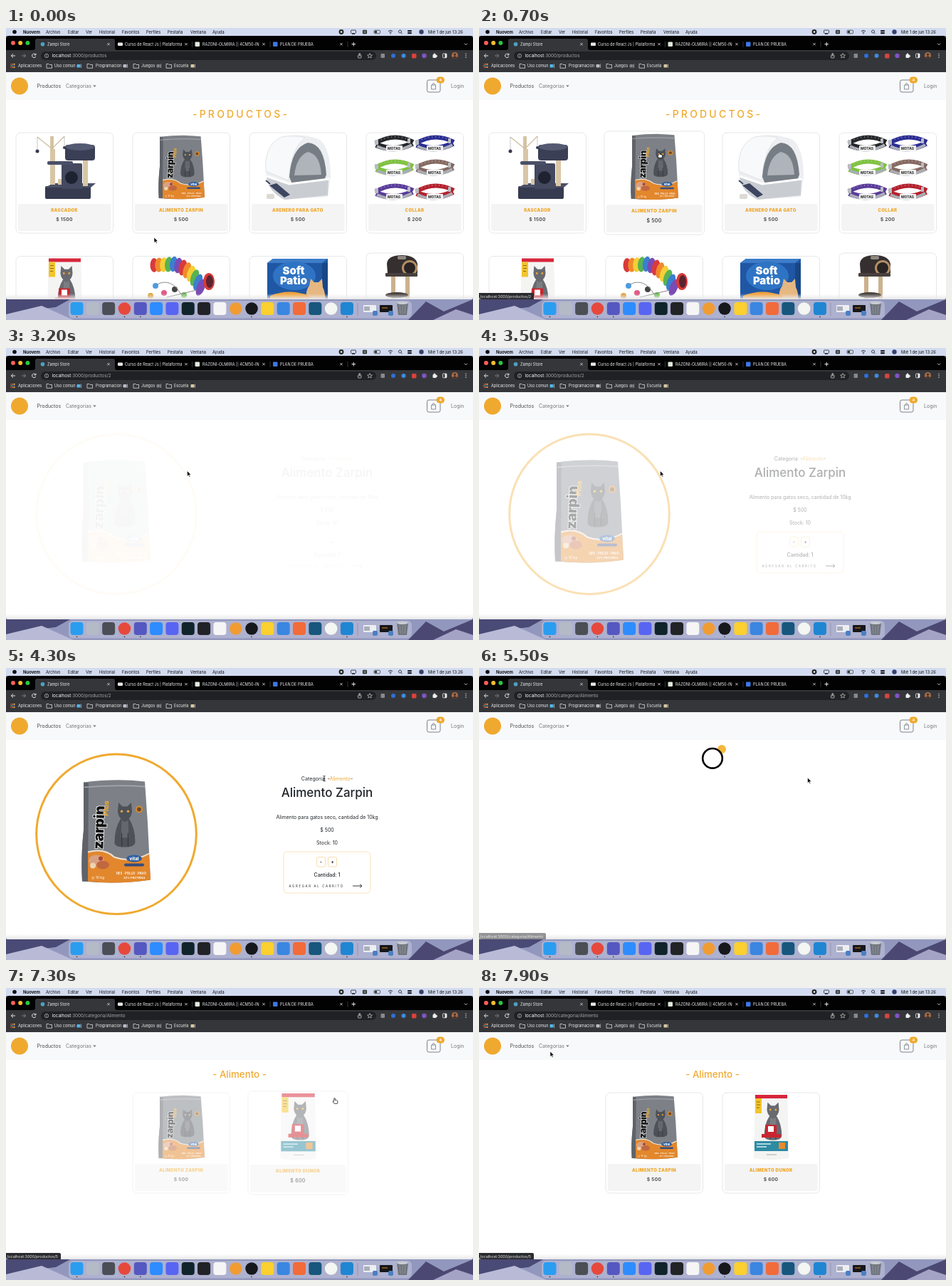
An HTML page that plays this animation: 656x410 px, repeating every 8 s.

```html
<!DOCTYPE html>
<html lang="es">
<head>
<meta charset="utf-8">
<title>Tienda</title>
<style>
html, body { margin: 0; width: 100%; height: 100%; overflow: hidden; background: #fff; }
svg { display: block; width: 656px; height: 410px; font-family: Inter, "Open Sans", sans-serif; white-space: pre; }
</style>
</head>
<body>
<svg id="stage" viewBox="0 0 656 410"></svg>
<script>
const ORANGE = '#f0a92f', INK = '#212529';

// Shape helpers; text is centred vertically on y
const R = (x, y, w, h, fill, rx = 0, more = '') =>
  `<rect x="${x}" y="${y}" width="${w}" height="${h}" fill="${fill}" rx="${rx}" ${more}/>`;
const C = (x, y, r, fill, more = '') => `<circle cx="${x}" cy="${y}" r="${r}" fill="${fill}" ${more}/>`;
const E = (x, y, rx, ry, fill, more = '') => `<ellipse cx="${x}" cy="${y}" rx="${rx}" ry="${ry}" fill="${fill}" ${more}/>`;
const P = (d, fill, more = '') => `<path d="${d}" fill="${fill}" ${more}/>`;
const L = (d, color, w = 1, more = '') =>
  `<path d="${d}" fill="none" stroke="${color}" stroke-width="${w}" ${more}/>`;
const T = (x, y, size, str, fill = INK, more = '') =>
  `<text x="${x}" y="${y + size * .36}" font-size="${size}" fill="${fill}" ${more}>${str}</text>`;
const G = (body, move = '', more = '') => `<g transform="${move}" ${more}>${body}</g>`;
const MID = 'text-anchor="middle" ';

const cat = (x, y, s, color) => G(
  P('M-9 -19L-8 -30L-3 -25H3L8 -30L9 -19Q8 -12 5 -10Q13 2 13 20Q12 26 0 26Q-13 26 -13 20Q-13 2 -5 -10Q-8 -12 -9 -19Z', color) +
  P('M-4 -8Q0 -4 4 -8L5 14H-5Z', '#fff', 'opacity=".13"') +
  L('M-4 25V8M4 25V8', '#33363c', 1) +
  C(-4, -19, 1.5, '#e9a63a') + C(4, -19, 1.5, '#e9a63a'), `translate(${x} ${y}) scale(${s})`);

// Product pictures
const bag =
  P('M3 3Q50 -3 89 2L93 60L97 140Q50 147 1 142Q-1 108 3 70Z', '#7d8187') +
  P('M3 3L10 4L9 142L1 142Q-1 108 3 70Z', '#5f6369') +
  L('M4 10Q50 6 89 9', '#a7aaaf', 1.5) +
  P('M9 102Q32 96 46 109Q70 118 95 104L97 140Q50 147 9 142Z', '#e2872c') +
  L('M9 101Q32 95 46 108Q70 117 95 103', '#f4e3cf', 2) +
  E(21, 113, 11, 8, '#d9a183') + E(30, 119, 9, 6, '#c2683f') + C(16, 120, 4, '#efd3b0') + C(27, 110, 3, '#a94736') +
  cat(61, 65, 1.12, '#4d5158') +
  T(0, 0, 20, 'zarpin', '#111', 'font-weight="900" stroke="#fff" stroke-width="1.6" paint-order="stroke" letter-spacing="-.6" transform="translate(23 97) rotate(-88)"') +
  T(0, 0, 10, 'Plus', ORANGE, 'font-weight="800" font-style="italic" transform="translate(34 50) rotate(-88)"') +
  C(81, 41, 5, '#d98a2c') + C(81, 41, 3, '#6d4a28') +
  E(74, 110, 11, 5, '#2f5f9e') + T(74, 110, 6, 'vital', '#fff', MID + 'font-weight="800"') +
  R(60, 117, 28, 4, '#354d7c', 2) +
  T(49, 131, 4.4, 'RES · POLLO · PAVO', '#fff', 'font-weight="600"') +
  T(14, 137, 5, '◎ 10 kg', '#fff') + T(59, 137, 4, '32% PROTEÍNA', '#fff', 'font-weight="600"');

const kibble =
  P('M2 0H47L48 30L49 89Q24 93 0 89L1 30Z', '#f4f4f3') +
  P('M2 0H47V5H2Z', '#d7263a') + R(2, 5, 9, 21, '#f3c52d') + L('M4 10H9M4 14H9M4 18H8', '#8a6a1c', 1) +
  cat(27, 39, .95, '#686a70') +
  R(16, 42, 16, 14, '#c9252f', 1) + R(20, 44, 8, 8, '#fff') +
  R(11, 55, 27, 5, '#c9252f') + R(1, 65, 47, 14, '#2e8ba3') + R(35, 67, 9, 9, '#e88b2f') +
  L('M4 69H24M4 73H18', '#d8eef2', 1.3) + L('M18 84H32', '#aaa', 1);

const scratcher =
  R(55, 222, 64, 18, '#373b50', 2) + P('M55 224L66 218H126L119 224Z', '#4b5068') +
  R(62, 170, 7, 50, '#d8c6a6') + R(108, 180, 7, 42, '#d8c6a6') + R(73, 212, 8, 8, '#d8c6a6') +
  R(78, 190, 29, 36, '#444960', 2) + C(92, 210, 9, '#1f2231') + R(58, 187, 36, 5, '#4b5068', 2) +
  R(83, 164, 42, 22, '#3b3f55', 4) + E(104, 167, 20, 5, '#555a73') + R(62, 152, 5, 30, '#d8c6a6') +
  L('M65 170L44 153M65 169L82 152M65 168V152', '#cfbf9f', 1.4) +
  L('M44 153V171M82 152V166', '#888', .5) + C(44, 173, 2.5, '#373b50') + C(82, 168, 2, '#373b50');

const litter =
  P('M365 201Q362 165 387 153Q415 146 441 157Q456 170 456 208L452 237L390 241Q366 230 365 201Z', '#eceef1') +
  P('M365 201Q362 165 387 153Q403 150 420 154Q400 170 397 214Z', '#f8f9fa', 'stroke="#d7dade" stroke-width=".7"') +
  P('M398 209Q401 168 424 161Q447 162 450 206L445 219H402Z', '#777d84') +
  P('M405 207Q408 180 424 174Q441 177 443 206Z', '#aeb4ba') +
  P('M366 208L398 219L453 212L452 235L392 241Q368 230 366 208Z', '#c9cdd2') + L('M366 208L398 219L454 212', '#fff', 3) +
  P('M370 221L380 218L399 234L391 238Z', '#3e4560') + L('M371 219L365 214', '#3e4560', 2) + R(366, 233, 11, 7, '#dcdad3', 2);

const collar = (color, i) => G(
  L('M2 11Q28 -5 55 9', color, 6) + L('M3 13Q29 24 54 11', color, 8) +
  L('M5 8Q29 -4 51 7', '#ddd', 1, 'stroke-dasharray="1 4"') + L('M4 15Q29 27 53 13', '#a9adb5', 4) +
  R(17, 14, 23, 8, '#f1f1f1', 1) + T(28, 18, 5, 'MOTAS', '#222', MID + 'font-weight="700"') +
  R(1, 6, 5, 7, '#b9bcc2', 1) + R(47, 4, 4, 7, '#b9bcc2', 1), `translate(${517 + i % 2 * 57} ${151 + (i >> 1) * 34})`);
const collars = ['#26272b', '#2b2d93', '#7fc241', '#866a62', '#5a3c9b', '#b3222e'].map(collar).join('');

const hues = ['#d93a3a', '#f08a2c', '#f4cf36', '#58b352', '#3a7fd0', '#7a4bb5'];
const tunnel = Array.from({ length: 12 }, (_, i) =>
  E(208 + i * 6.6, 333 + Math.abs(i - 4) * i * .25, 5.5, 10 + i * .2, hues[i % 6], `transform="rotate(${i * 2} 246 340)"`)).join('') +
  E(285, 356, 8, 12, '#d93a3a') + E(286, 356, 5, 9, '#5a2430') +
  [[210, 362, '#4c9be0'], [222, 372, '#e25b86'], [237, 367, '#444'], [250, 375, '#6bbf55'], [203, 376, '#e0a03a']]
    .map(([x, y, c]) => C(x, y, 4, c)).join('') + L('M212 360Q232 350 246 374M226 378L268 368', '#888', 1);

const sand =
  P('M367 330L375 324H452V390H367Z', '#1f57a4') + P('M367 330L375 324H452L444 330Z', '#3c7cc8') +
  R(444, 330, 8, 60, '#184686') + E(405, 348, 30, 20, '#2f74c4') +
  T(404, 341, 15, 'Soft', '#fff', MID + 'font-weight="900"') + T(404, 355, 15, 'Patio', '#fff', MID + 'font-weight="900"') +
  P('M423 390Q419 370 426 362L428 352L433 357H439L444 352L445 364Q450 374 448 390Z', '#e6b780') +
  P('M371 376Q398 365 426 376V390H371Z', '#f0a23c');

const tower =
  P('M535 331Q536 319 556 319Q575 319 578 331V344H536Z', '#35302f') + C(567, 337, 11, '#b58f66') + C(567, 337, 8, '#2a2423') +
  R(550, 320, 12, 5, '#8f8880', 2) + R(533, 344, 45, 5, '#47403d', 1) +
  R(541, 349, 6, 41, '#cbb28d') + R(561, 349, 6, 41, '#cbb28d') + E(549, 375, 16, 4, '#47403d');

// Cards
const card = (x, y, name, price, pic, id = '') => G(
  R(x, y, 136.5, 141, '#fff', 6, 'stroke="#e4e5e7" stroke-width=".9"') + pic +
  R(x + 3, y + 100, 130.5, 38, '#f4f4f5', 3) +
  T(x + 68, y + 108.5, 6, name, ORANGE, MID + 'font-weight="900" letter-spacing=".35"') +
  T(x + 68, y + 122, 6.8, price, '#444', MID + 'font-weight="600" letter-spacing=".25"'), '', id && `id="${id}"`);
const use = (id, x, y, sx = 1, sy = sx) => `<use href="#${id}" transform="translate(${x} ${y}) scale(${sx} ${sy})"/>`;
const smallBag = use('bag', 214, 151, .67, .62);

const home =
  T(262, 121, 14, '-PRODUCTOS-', ORANGE, 'font-weight="500" letter-spacing="3.2"') +
  card(14, 147, 'RASCADOR', '$ 1500', scratcher) +
  card(342, 147, 'ARENERO PARA GATO', '$ 500', litter) +
  card(506, 147, 'COLLAR', '$ 200', collars) +
  card(14, 320.5, '', '', use('kibble', 58, 323.5)) +
  card(178, 320.5, '', '', tunnel) +
  card(342, 320.5, '', '', sand) +
  card(506, 316, '', '', tower) +
  card(178, 147, 'ALIMENTO ZARPIN', '$ 500', smallBag, 'hoverA');

const detail =
  C(155, 233.3, 112.3, '#fff', `stroke="${ORANGE}" stroke-width="3"`) + use('bag', 106, 157.5) +
  T(451, 155, 7.1, `Categoria: -<tspan fill="${ORANGE}">Alimento</tspan>-`, INK, MID) +
  T(451, 174.5, 17, 'Alimento Zarpin', INK, MID + 'font-weight="500"') +
  T(451, 209, 6.95, 'Alimento para gatos seco, cantidad de 10kg', INK, MID) +
  T(451, 227, 7, '$ 500', INK, MID) + T(451, 245.5, 7, 'Stock: 10', INK, MID) +
  R(390, 258, 122, 58, '#fff', 5, 'stroke="#f8e3bb"') +
  [[436.5, '-'], [452.5, '+']].map(([x, s]) =>
    R(x, 265.5, 12, 13.5, '#fff', 2, 'stroke="#f4d596" stroke-width=".8"') + T(x + 6, 272, 7, s, INK, MID + 'font-weight="600"')).join('') +
  T(451, 290, 7, 'Cantidad: 1', INK, MID + 'font-weight="500"') +
  T(397.5, 306, 4.3, 'AGREGAR AL CARRITO', INK, 'letter-spacing="1.7"') +
  L('M487 306H500M497 303.5L500 306L497 308.5', INK, .9);

const category =
  T(328, 121, 13.3, '- Alimento -', ORANGE, MID + 'font-weight="500"') +
  G(card(178, 147, 'ALIMENTO ZARPIN', '$ 500', smallBag) +
    card(342, 147, 'ALIMENTO DUNOR', '$ 600', use('kibble', 386, 150), 'hoverB'), '', 'id="cards"');

// Desktop and browser
const menu = [['Archivo', 56], ['Editar', 87], ['Ver', 112], ['Historial', 131], ['Favoritos', 163],
  ['Perfiles', 197], ['Pestaña', 227], ['Ventana', 259], ['Ayuda', 290]];
const desktop =
  R(0, 0, 656, 410, '#9297bd') +
  P('M0 381H90L70 392L36 396L0 410Z', '#4a4a76') + P('M0 402L50 390L95 410H0Z', '#b9bad6') +
  P('M565 410L590 384L615 398L656 381V410Z', '#4b4873') + P('M600 410L632 395L656 403V410Z', '#a4a3c6') +
  R(0, 0, 656, 11, '#d3dbf0') + C(12, 5.5, 2.8, '#111') +
  T(24, 5.5, 5.9, 'Nuovem', '#111', 'font-weight="700"') + menu.map(([s, x]) => T(x, 5.5, 5.7, s, '#111')).join('') +
  C(471, 5.5, 3.4, '#222') + R(469.8, 4.3, 2.4, 2.4, '#eee') +
  R(484.5, 3, 7, 4.5, 'none', 1, 'stroke="#222" stroke-width=".8"') + R(486, 8, 4, .8, '#222') +
  R(501, 2.8, 6, 5.5, '#222', 1) + L('M502 4.5H506M502 6.5H506', '#ddd', .7) +
  R(517, 3.2, 8.5, 4.6, 'none', 1.2, 'stroke="#222" stroke-width=".7"') + R(518, 4.2, 3, 2.6, '#222') +
  L('M537 4.6Q540 2 543 4.6M538.5 6.3Q540 5 541.5 6.3', '#222', .9) + C(540, 7.8, .7, '#222') +
  C(553.5, 5, 2, 'none', 'stroke="#222" stroke-width=".8"') + L('M555 6.5L556.6 8.2', '#222', .9) +
  R(564, 3, 6, 2.2, '#222', 1) + R(564, 6, 6, 2.2, '#222', 1) + C(583.5, 5.5, 3.2, '#35406f') +
  T(593, 5.5, 5.8, 'Mié 1 de jun  13:26', '#111');

const dockColors = ['#2a9df0', '#b4bac6', '#4b4f55', '#e6483c', '#5558c0', '#2d8cff', '#5865f2', '#10242c', '#222326',
  '#f5f5f5', '#f09c33', '#17181c', '#fbd02f', '#3a86e0', '#f26b3a', '#17567d', '#f3f6f2', '#1f86d2'];
const round = [3, 10, 11, 16];
const dock =
  R(88, 383, 482, 24.5, '#b7bad6', 6, 'opacity=".75"') +
  dockColors.map((c, i) => {
    const x = 99.5 + i * 22.32;
    return round.includes(i) ? C(x, 394, 8.8, c) : R(x - 9, 385, 18, 18, c, 4);
  }).join('') +
  [0, 3, 4, 11, 17].map(i => C(99.5 + i * 22.32, 405.5, .8, '#222')).join('') +
  L('M494 386V404', '#8084a5', .6) +
  R(502, 389, 18, 10, '#eceef2', 1) + R(503, 391, 8, 6, '#a9afba') + R(515, 397, 7, 7, '#4b7fc4', 2) +
  R(525, 389, 18, 10, '#16171a', 1) + L('M528 393H536', '#e0822f', 1) + R(537, 397, 7, 7, '#4b7fc4', 2) +
  P('M549 386H565L563 403H551Z', '#70757d') + E(557, 386, 8, 2, '#c9ccd2') + L('M553 389L554 401M557 389V401M561 389L560 401', '#a4a8af', .6);

const tabs = [['Zampi Store', 58, 144], ['Curso de React Js | Plataforma', 167, 253],
  ['RAZONI-OLMIIRA || 4CM50-IN', 276, 362], ['PLAN DE PRUEBA', 385, 471]];
const marks = [['Uso comun', 57, 68, '#4fb7ea', 100], ['Programacion', 114, 126, '#b9bec6', 165],
  ['Juegos', 179, 190, '#7b7f88', 212], ['Escuela', 225, 236, '#d9c9a0', 260]];
const cross = x => L(`M${x - 1.7} 21L${x + 1.7} 24.4M${x + 1.7} 21L${x - 1.7} 24.4`, '#ddd', .8);
const browser =
  P('M0 15Q0 11 4 11H652Q656 11 656 15V62H0Z', '#020203') +
  ['#ff5f57', '#febc2e', '#28c840'].map((c, i) => C(10 + i * 10.2, 21, 3, c)).join('') +
  P('M38 31Q41 31 41 28V18Q41 15 44 15H150Q153 15 153 18V28Q153 31 156 31Z', '#35363a') +
  R(0, 31, 656, 31, '#35363a') +
  tabs.map(([s, x, end], i) => `<clipPath id="tab${i}"><rect x="${x}" y="15" width="${end - x - 6}" height="16"/></clipPath>` +
    T(x, 22.7, 5.5, s, '#eceef0', `clip-path="url(#tab${i})"`) + cross(end)).join('') +
  C(51.5, 22.7, 2.8, '#4aa3c7') + R(157, 20.6, 7, 4.4, '#e6e6e6', 1) + R(265.5, 19.5, 6.5, 6.5, '#dfeadb', 1) + R(375, 19.5, 6.5, 6.5, '#3b78e7', 1) +
  L('M261.5 19V27M371 19V27M480 19V27', '#55565a', .6) +
  L('M485.5 22.7H491M488.2 20V25.5', '#eee', 1) + L('M644 21.7L646 23.7L648 21.7', '#ddd', .9) +
  L('M13 39H7.5M10 36.3L7.3 39L10 41.7', '#e6e6e6', 1) + L('M22 39H27.5M25 36.3L27.7 39L25 41.7', '#7c7d80', 1) +
  L('M41.6 37.4A2.7 2.7 0 1 0 41.8 40M41.9 35.7V38H39.6', '#e6e6e6', 1) +
  R(49, 33, 471, 12, '#202124', 6) + C(57, 39, 2.7, 'none', 'stroke="#bbb" stroke-width=".7"') + L('M57 38.5V40.6M57 37V37.8', '#bbb', .8) +
  `<text x="64.5" y="41.2" font-size="6.3" fill="#a6a9ad"><tspan fill="#fff">localhost</tspan>:3000<tspan id="path"></tspan></text>` +
  R(494.5, 38, 4.5, 4, 'none', .6, 'stroke="#ccc" stroke-width=".8"') + L('M496.8 40V35.5M495.3 37L496.8 35.4L498.3 37', '#ccc', .8) +
  P('M511 35.5L512 38H514.5L512.6 39.6L513.3 42L511 40.6L508.7 42L509.4 39.6L507.5 38H510Z', 'none', 'stroke="#ccc" stroke-width=".7"') +
  R(526.5, 36, 5.5, 6, '#86898d', 1) + C(544, 39, 3, '#2f6fd6') +
  C(558.5, 39, 3, '#3f8bd8') + R(570, 36, 6.5, 6.5, '#d8433c', 1.5) + C(587.5, 39, 3.2, '#8252c7') +
  R(599.5, 37, 5, 5, '#eee', 1) + C(602, 36.7, 1.2, '#eee') + C(604.8, 39.4, 1.2, '#eee') +
  R(613.5, 36, 5.5, 5.8, 'none', 1, 'stroke="#eee" stroke-width=".8"') + R(616.5, 36, 2.5, 5.8, '#eee') +
  C(630.5, 38.5, 4.5, '#a86d4a') + C(630.5, 37.3, 1.7, '#463129') + P('M627 41.3Q630.5 37.6 634 41.3Q630.5 44.5 627 41.3Z', '#463129') +
  [36.3, 38.8, 41.3].map(y => C(646, y, .7, '#ddd')).join('') +
  Array.from({ length: 9 }, (_, i) => R(6.5 + i % 3 * 2.2, 50 + (i / 3 | 0) * 2.2, 1.6, 1.6, hues[i % 6])).join('') +
  T(17, 53.2, 5.5, 'Aplicaciones', '#f0f0f0') +
  marks.map(([s, icon, x, c, end]) => P(`M${icon} 50.5H${icon + 3}L${icon + 4} 51.5H${icon + 7.5}V56.3H${icon}Z`, 'none', 'stroke="#d8d8d8" stroke-width=".8"') +
    T(x, 53.2, 5.5, s, '#f0f0f0') + R(end - .5, 51, 5, 4.5, c, 1) + R(end + 5.2, 50.5, .6, 5.5, '#ddd')).join('');

const nav =
  R(0, 62, 656, 39, '#f8f9fa') + C(19, 81.5, 12, ORANGE) +
  T(43.5, 81.8, 7, 'Productos', '#4a4c4e') + T(84, 81.8, 7, 'Categorias', '#75777a') + P('M122.2 80.5H126.6L124.4 82.8Z', '#666') +
  R(591.5, 73, 18.5, 17, 'none', 2.5, 'stroke="#6c757d" stroke-width=".9"') +
  P('M597.6 80H603.6V86H597.6ZM599 80Q599 77.6 600.6 77.6Q602.2 77.6 602.2 80', 'none', 'stroke="#6c757d" stroke-width=".8"') +
  R(604.5, 68.5, 11.5, 9, ORANGE, 4.5) + T(610.2, 73, 5.2, '4', '#fff', MID + 'font-weight="700"') +
  T(625, 81.8, 7, 'Login', '#75777a');

const pointer =
  G(P('M0 0V7.4L1.8 5.9L3 8.6L4.2 8L3 5.4H5.4Z', '#000', 'stroke="#fff" stroke-width=".6"'), '', 'id="arrow"') +
  G(P('M-.8 1Q.1 .2 .9 1V3.5Q2 3 2.4 3.8Q3.4 3.4 3.7 4.3Q4.6 4.3 4.5 5.5L3.9 8.3H-.4L-2.5 5.3Q-2.2 4.4 -.8 5.2Z', '#fff', 'stroke="#000" stroke-width=".7"'), '', 'id="hand"') +
  G(L('M-1.6 -2.5Q0 -2.5 0 -1.5Q0 -2.5 1.6 -2.5M0 -1.5V4.5M-1.6 5Q0 5 0 4Q0 5 1.6 5M-1 1.5H1', '#111', .8), '', 'id="beam"');

const stage = document.getElementById('stage');
stage.innerHTML =
  `<defs><g id="bag">${bag}</g><g id="kibble">${kibble}</g>
  <clipPath id="win"><path d="M0 62H656V377Q656 381 652 381H4Q0 381 0 377Z"/></clipPath>
  <linearGradient id="fade" x2="0" y2="1"><stop stop-color="#eee" stop-opacity="0"/><stop offset="1" stop-color="#e6e6e8"/></linearGradient></defs>` +
  desktop + dock + browser +
  G(R(0, 62, 656, 319, '#fff') + G(home, '', 'id="home"') + G(detail, '', 'id="detail"') + G(category, '', 'id="category"') +
    C(0, 0, 6, '#f6b73c', 'id="ball"') + C(328, 126.8, 13.8, '#fff', 'id="ring" stroke="#000" stroke-width="2.6"') +
    R(0, 373, 656, 8, 'url(#fade)') + nav +
    G(R(-4, 372, 0, 12, '#2b2c2f', 2, 'id="tip"') + T(2, 376.6, 5.4, '', '#e8e8e8', 'id="tipText"'), '', 'id="status"'),
    '', 'clip-path="url(#win)"') +
  G(pointer, '', 'id="cursor"');

// Motion
const $ = id => document.getElementById(id);
const ramp = (t, a, b) => Math.min(1, Math.max(0, (t - a) / (b - a)));
const ease = k => k * k * (3 - 2 * k);
const within = (t, a, b) => t >= a && t < b;
const show = (id, o) => {
  $(id).style.display = o > 0 ? '' : 'none';
  $(id).setAttribute('opacity', +o);
};
const grow = (id, cx, k) =>
  $(id).setAttribute('transform', `translate(${cx} 217.5) scale(${1 + .03 * k}) translate(${-cx} -217.5)`);

const track = [[0, 208, 294], [100, 208, 294], [700, 253, 174], [2000, 253, 174], [2200, 254.5, 172.5],
  [3700, 254.5, 172.5], [4300, 447, 154], [4550, 461.5, 154], [7300, 461.5, 154], [7800, 100, 89], [8000, 100, 89]];
const hints = [[450, 1400, '/productos/2', 77], [4550, 5700, '/categoria/Alimento', 94], [7250, 8000, '/productos/5', 77]];

function draw(t) {
  $('path').textContent = t < 1400 ? '/productos' : t < 5200 ? '/productos/2' : '/categoria/Alimento';
  show('home', t < 1400);
  show('detail', t < 5200 ? ramp(t, 3160, 4100) : 0);
  show('category', t >= 6550);
  show('cards', ramp(t, 6900, 7700));
  grow('hoverA', 246, ease(ramp(t, 250, 500)));
  grow('hoverB', 410, 1 - ease(ramp(t, 7350, 7650)));

  show('ring', within(t, 1400, 3000) || within(t, 5200, 6550));
  show('ball', within(t, 1400, 1950) || within(t, 5200, 6000));
  const a = (t - (t < 4000 ? 1700 : 5500)) * Math.PI / 500 - Math.PI / 4;
  $('ball').setAttribute('cx', 328 + 18.2 * Math.cos(a));
  $('ball').setAttribute('cy', 126.8 + 18.2 * Math.sin(a));

  const hint = hints.find(h => within(t, h[0], h[1]));
  show('status', hint ? (within(t, 5200, 5700) ? 1 - ramp(t, 5300, 5700) : 1) : 0);
  if (hint) {
    $('tipText').textContent = 'localhost:3000' + hint[2];
    $('tip').setAttribute('width', hint[3] + 4);
  }

  const i = track.findIndex(p => p[0] > t), [t0, x0, y0] = track[i - 1], [t1, x1, y1] = track[i];
  const k = ease(ramp(t, t0, t1));
  $('cursor').setAttribute('transform', `translate(${x0 + (x1 - x0) * k} ${y0 + (y1 - y0) * k})`);
  const hand = within(t, 300, 1450) || within(t, 4480, 5250) || within(t, 7000, 7400);
  const beam = within(t, 4180, 4480);
  show('hand', hand);
  show('beam', beam);
  show('arrow', !hand && !beam);
}

function loop() {
  draw(performance.now() % 8000);
  requestAnimationFrame(loop);
}
loop();
</script>
</body>
</html>
```
